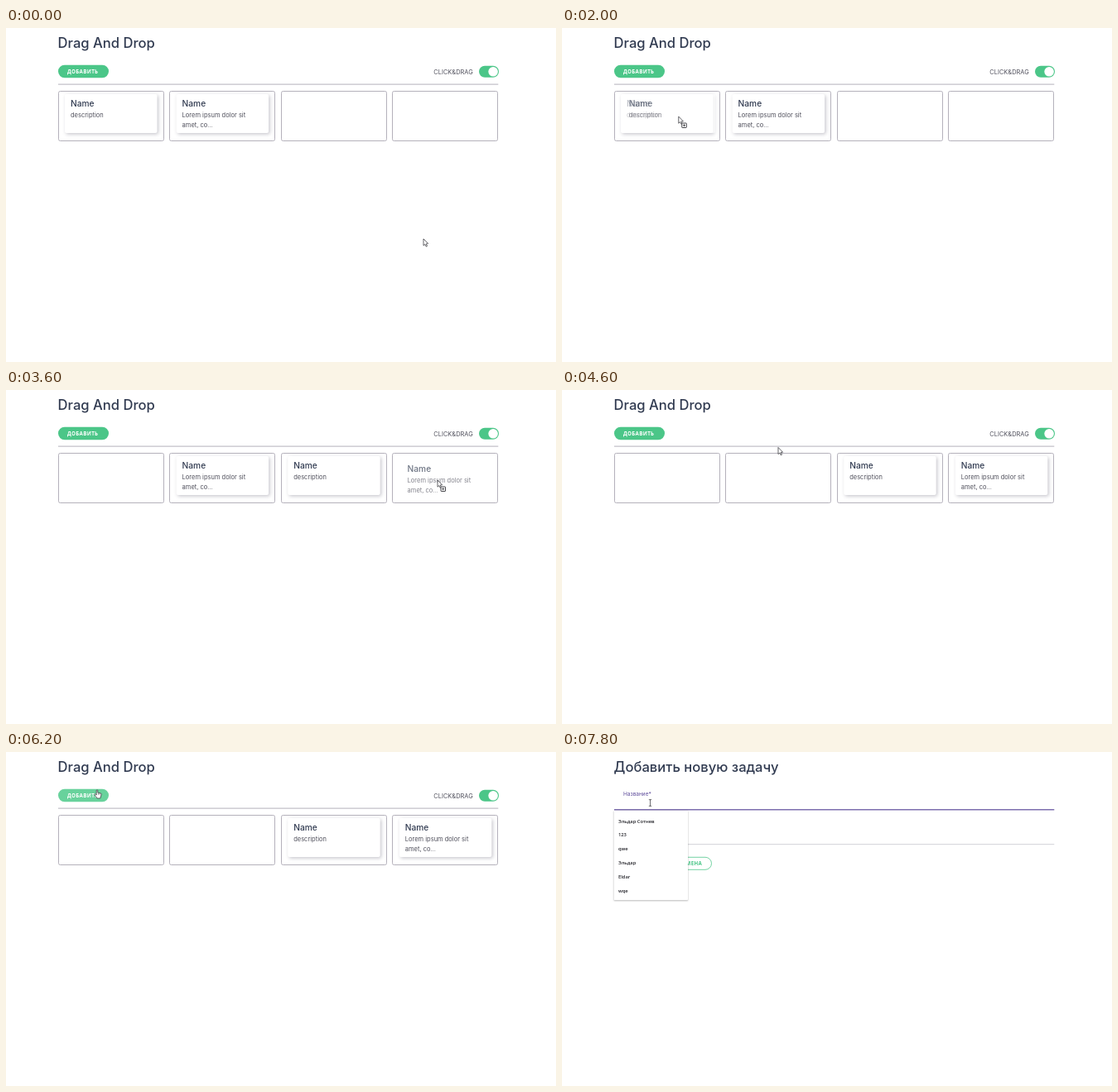
An HTML page with a canvas that plays this animation: 664x404 px, repeating every 8 s.

```html
<!DOCTYPE html>
<html lang="ru">
<head>
<meta charset="utf-8">
<title>Drag And Drop</title>
<style>
html, body { margin: 0; width: 100%; height: 100%; overflow: hidden; background: #fff; }
canvas { display: block; width: 664px; height: 404px; }
</style>
</head>
<body>
<canvas id="stage"></canvas>
<script>
const W = 664, H = 404, LOOP = 8000, STEP = 100;
const canvas = document.getElementById('stage');
const ctx = canvas.getContext('2d');
const dpr = window.devicePixelRatio || 1;
canvas.width = W * dpr;
canvas.height = H * dpr;

const INTER = 'Inter, sans-serif';
const BUTTON_FONT = '700 6.2px "Open Sans", sans-serif';
const MENU_FONT = '600 5.8px "Open Sans", sans-serif';
const GREEN = '#4bc688', HOVER = '#68d29c', PURPLE = '#5d4b9b';
const INK = '#303a50', BODY = '#50505c', LINE = '#b4b1bb', DARK = '#333338', HINT = '#77757f';
const LEFT = 63, PITCH = 134.6;
const CARD = { x: 71, y: 80, w: 111.5, h: 47 };
const BUTTON = { x: LEFT, y: 44.8, w: 61, h: 15.5 };

const CARDS = [
  { lines: ['description'], from: 0, to: 2, grab: { x: 138, y: 107 }, start: 2000, drop: 2600 },
  { lines: ['Lorem ipsum dolor sit', 'amet, co...'], from: 1, to: 3, grab: { x: 249, y: 105 }, start: 3300, drop: 3900 }
];
const MENU = ['Эльдар Сотнев', '123', 'qwe', 'Эльдар', 'Eldar', 'wqe'];
const PAGE_AT = 6300, FOCUS_AT = 7300, MENU_AT = 7500, CARET_OFF = 7800;

// Pointer legs: start, end, and the point reached; it rests in between.
const HOME = { x: 504, y: 255 };
const LEGS = [
  [400, 1300, 164, 21],
  [1300, 1700, 138, 107],
  [1960, 2600, 385, 112],
  [2700, 3200, 249, 105],
  [3200, 3600, 521, 109],
  [3800, 3900, 531, 117],
  [4200, 4850, 128, 46],
  [4850, 5400, 501, 53],
  [5400, 6000, 110, 46],
  [6600, 7000, 106.5, 61.5]
];

const clamp = v => Math.min(1, Math.max(0, v));
const ease = k => k * k * (3 - 2 * k);
const inside = (p, r) => p.x >= r.x && p.x <= r.x + r.w && p.y >= r.y && p.y <= r.y + r.h;

function pointer(t) {
  return LEGS.reduce((p, [from, to, x, y]) => {
    const k = ease(clamp((t - from) / (to - from)));
    return { x: p.x + (x - p.x) * k, y: p.y + (y - p.y) * k };
  }, HOME);
}

function text(str, x, y, font, color, spacing = 0) {
  ctx.font = font;
  ctx.fillStyle = color;
  ctx.letterSpacing = spacing + 'px';
  ctx.fillText(str, x, y);
}

function box(x, y, w, h, r, fill, stroke, line = 1) {
  ctx.beginPath();
  ctx.roundRect(x, y, w, h, r);
  if (fill) { ctx.fillStyle = fill; ctx.fill(); }
  if (stroke) { ctx.strokeStyle = stroke; ctx.lineWidth = line; ctx.stroke(); }
}

function bar(x, y, w, h, color = DARK) {
  ctx.fillStyle = color;
  ctx.fillRect(x, y, w, h);
}

function shadow(color, blur, dx, dy) {
  ctx.shadowColor = color;
  ctx.shadowBlur = blur * dpr;
  ctx.shadowOffsetX = dx * dpr;
  ctx.shadowOffsetY = dy * dpr;
}

const rule = (y, color, h = 1) => bar(LEFT, y, 531.3, h, color);
const title = str => text(str, 62.6, 24, '500 16.6px ' + INTER, INK);

function drawCard(card, dx, dy, ghost) {
  ctx.save();
  ctx.translate(dx, dy);
  if (ghost) ctx.globalAlpha = 0.7;
  else shadow('rgba(40,35,60,0.26)', 4, 1.5, 1.5);
  box(CARD.x, CARD.y, CARD.w, CARD.h, 2, '#fff');
  shadow('transparent', 0, 0, 0);
  text('Name', 78, 95, '500 10.2px ' + INTER, INK);
  card.lines.forEach((s, i) => text(s, 78, 107.5 + i * 12.7, '7.5px ' + INTER, BODY));
  ctx.restore();
}

function addButton(y, color) {
  box(BUTTON.x, y, BUTTON.w, BUTTON.h, BUTTON.h / 2, color);
  text('ДОБАВИТЬ', 74, y + 9.8, BUTTON_FONT, '#fff', 0.35);
}

function board(t, p) {
  const hover = inside(p, BUTTON);
  title('Drag And Drop');
  addButton(BUTTON.y, hover ? HOVER : GREEN);
  text('CLICK&DRAG', 516.3, 55.5, '7.45px ' + INTER, BODY);
  box(571, 45.8, 24, 14, 7, GREEN);
  box(582.3, 47, 11.6, 11.6, 5.8, '#fff');
  rule(67.6, LINE);
  for (let i = 0; i < 4; i++) {
    box(LEFT + Math.floor(PITCH * i) + 0.5, 76.5, 127, 60, 2, null, LINE);
  }

  let cursor = hover ? hand : arrow;
  for (const c of CARDS) {
    const dx = (t < c.drop ? c.from : c.to) * PITCH;
    drawCard(c, dx, 0, false);
    if (inside(p, { ...CARD, x: CARD.x + dx })) cursor = move;
  }
  const held = CARDS.find(c => t >= c.start && t < c.drop);
  if (!held) return cursor;
  drawCard(held, held.from * PITCH + p.x - held.grab.x, p.y - held.grab.y, true);
  return copy;
}

function form(t) {
  const focus = t >= FOCUS_AT;
  const lift = clamp((t - FOCUS_AT + STEP) / 200);
  title('Добавить новую задачу');
  text('Название*', 74, 61 - 8 * lift, `${8.6 - 2.1 * lift}px ${INTER}`, focus ? PURPLE : HINT);
  rule(69.2, focus ? PURPLE : LINE, focus ? 1.2 : 1);
  text('Описание', 74, 102.5, '8.6px ' + INTER, HINT);
  rule(111.2, '#d2d0d7');
  addButton(127, GREEN);
  box(129.5, 127.3, 51, 15, 7.5, '#fff', '#74d3a3');
  text('ОТМЕНА', 140.5, 136.8, BUTTON_FONT, GREEN, 0.35);
  if (focus && t < CARET_OFF) bar(74, 57.5, 0.7, 9);
  if (t >= MENU_AT) menu();
  return beam;
}

function menu() {
  ctx.save();
  shadow('rgba(0,0,0,0.35)', 2, 0, 0.6);
  box(62.7, 71, 89.3, 108.3, 1, '#fff');
  ctx.restore();
  MENU.forEach((s, i) => text(s, 68, 85.6 + i * 16.8, MENU_FONT, '#25252b'));
}

function outline(path) {
  const shape = new Path2D(path);
  ctx.fillStyle = '#fff';
  ctx.fill(shape);
  ctx.strokeStyle = DARK;
  ctx.lineWidth = 0.75;
  ctx.stroke(shape);
}

const arrow = () => outline('M0 0V8.2L1.9 6.6 3.2 9.4 4.5 8.8 3.2 6 5.6 5.8Z');

function copy() {
  arrow();
  box(4, 8, 5.5, 5.5, 0.5, '#fff', DARK, 0.9);
  bar(5.3, 10.35, 2.9, 0.8);
  bar(6.35, 9.3, 0.8, 2.9);
}

function move() {
  for (let i = 0; i < 4; i++) {
    outline('M0-5.4L2.2-3H.8V-.8H-.8V-3H-2.2Z');
    ctx.rotate(Math.PI / 2);
  }
  bar(-0.7, -0.7, 1.4, 1.4);
}

function hand() {
  outline('M-.8 .2Q0-.6 .8 .2V3.2L4.6 4 5.2 5 3.8 10H0L-3.2 5.4-2.4 4.7-.8 6Z');
  for (const x of [1.4, 2.8]) bar(x, 4, 0.5, 1.8);
}

function beam() {
  bar(-0.35, -3.8, 0.7, 7.6);
  for (const y of [-4.1, 3.4]) bar(-1.7, y, 3.4, 0.7);
}

function draw(now) {
  const t = Math.floor((now % LOOP) / STEP) * STEP;
  ctx.setTransform(dpr, 0, 0, dpr, 0, 0);
  bar(0, 0, W, H, '#fff');
  const p = pointer(t);
  const cursor = t < PAGE_AT ? board(t, p) : form(t);
  ctx.translate(p.x, p.y);
  cursor();
}

const start = performance.now();
function tick() {
  draw(performance.now() - start);
  requestAnimationFrame(tick);
}
tick();
</script>
</body>
</html>
```
